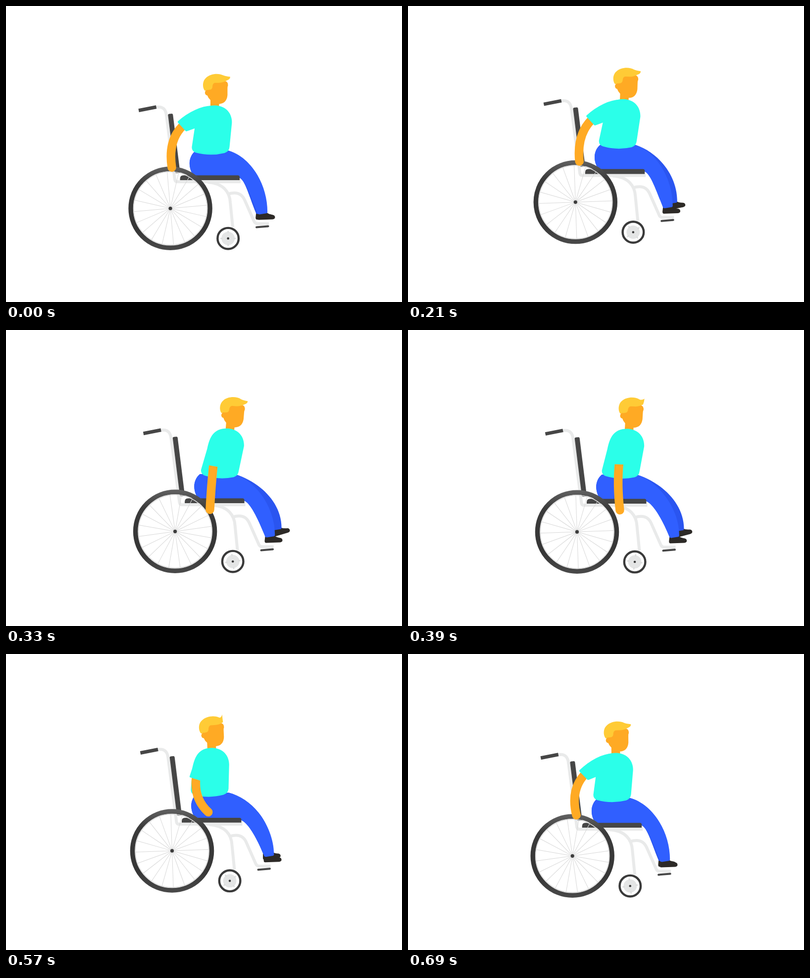
Animation of 800 by 600 pixels, one loop 0.72 s. Source, as an HTML page:

```html
<!DOCTYPE html>
<html lang="en">
<head>
<meta charset="utf-8">
<title>Wheelchair ride</title>
<style>
  html, body { margin: 0; width: 100%; height: 100%; overflow: hidden; background: #fff; }
  svg { display: block; width: 800px; height: 600px; }
  .tube { fill: none; stroke: #e9eaea; stroke-width: 6; stroke-linejoin: round; }
  .dark { fill: #464646; stroke: #464646; stroke-linecap: round; stroke-linejoin: round; }
  .spokes { stroke: #d8d8d8; stroke-width: 1; }
  .shirt { fill: #2bffe9; }
  .skin { fill: #ffaa24; }
  .hair { fill: #ffcb36; }
  .shoe { fill: #2d2a27; }
</style>
</head>
<body>
<svg viewBox="0 0 800 600">
  <defs>
    <linearGradient id="rim" x1="0" y1="-85" x2="0" y2="85" gradientUnits="userSpaceOnUse">
      <stop offset="0" stop-color="#626262"/>
      <stop offset=".22" stop-color="#3b3b3b"/>
      <stop offset=".75" stop-color="#363636"/>
      <stop offset="1" stop-color="#4a4a4a"/>
    </linearGradient>
    <path id="shoe" d="M-10 1 L8 -1 Q13 3 21 4 Q25 5 25 9 Q25 12 20 13 L-8 14 Q-11 14 -11 10 Z"/>
  </defs>

  <g class="chair">
    <path class="tube" d="M-29 -205 C-14 -208 -9 -199 -8 -188 L9 -58 Q10 -54 14 -54 H142"/>
    <path class="dark" stroke-width="7" stroke-linecap="butt" d="M-64 -198.500 L-28.500 -205.500" style="stroke-linecap: butt"/>
    <path class="dark" stroke-width="5" d="M-2.300 -189 L2.700 -189.500 L17 -74 H12 Z"/>
    <path class="tube" d="M75 -53 C108 -51 120 -32 121 -12 L126 38"/>
    <path class="tube" d="M116 -29 C138 -36 146 -26 150 -17 L169 26 Q171 31 176 31 H199"/>
    <path class="dark" stroke-width="4" d="M174 38.200 L197.500 36.200"/>
  </g>

  <use id="farShoe" href="#shoe" class="shoe"/>
  <path id="farLeg" fill="#2a55f0"/>
  <use id="nearShoe" href="#shoe" class="shoe"/>
  <path id="nearLeg" fill="#305fff"/>

  <g class="chair">
    <path d="M19.500 -57.200 V-60 Q19.500 -67 26 -67 H136 Q140 -67 140 -63 V-57.200 Z" fill="#464646"/>
    <circle r="80" fill="none" stroke="url(#rim)" stroke-width="9.500"/>
    <circle r="74" fill="none" stroke="#dedede" stroke-width="1.500"/>
    <g id="spokes" class="spokes"></g>
    <circle r="3.600" fill="#3c3c3c"/>
    <g transform="translate(116.600 60.900)">
      <circle r="21.300" fill="#fff" stroke="#3a3a3a" stroke-width="4.400"/>
      <circle r="13.500" fill="#e4e5e5"/>
      <g id="caster" stroke="#dcdddd" stroke-width="2.500"></g>
      <circle r="2.300" fill="#3a3a3a"/>
    </g>
  </g>

  <g id="head">
    <path class="skin" d="M-9 3 V-12 Q-18 -20 -17 -36 L-4 -50 H22 Q27 -48 26.500 -41 Q25.500 -40 25.500 -36 V-22 Q24 -5 8.500 -4 V3 Z"/>
    <path id="hair" class="hair"/>
    <ellipse class="skin" cx="-15.500" cy="-27" rx="4.500" ry="5.500"/>
  </g>
  <path id="torso" class="shirt"/>
  <path id="arm" fill="none" stroke="#ffaa24" stroke-width="17.500" stroke-linecap="round"/>
  <path id="sleeve" class="shirt" stroke="#2bffe9" stroke-width="4" stroke-linejoin="round"/>
</svg>
<script>
const LOOP = 720, STEP = 30;
const RAD = Math.PI / 180;
const $ = id => document.getElementById(id);

// Mean plus cosine and sine amplitudes of the first, second, ... harmonic.
const wave = (phase, mean, ...amps) => amps.reduce((sum, a, i) =>
  sum + a * (i % 2 ? Math.sin : Math.cos)(phase * (1 + (i >> 1))), mean);

const off = (p, x, y) => [p[0] + x, p[1] + y];
// Point at a distance below p, swung backwards by an angle in degrees.
const swung = (p, angle, length) =>
  off(p, -length * Math.sin(angle * RAD), length * Math.cos(angle * RAD));
const mid = (a, b) => [(a[0] + b[0]) / 2, (a[1] + b[1]) / 2];

const draw = (id, ...parts) => $(id).setAttribute('d', parts.map(
  p => typeof p === 'string' ? p : p.map(n => n.toFixed(2)).join(' ')).join(' '));
const move = (el, p, angle = 0) =>
  el.setAttribute('transform', `translate(${p[0].toFixed(2)} ${p[1].toFixed(2)}) rotate(${angle.toFixed(2)})`);

function leg(id, hub, ankle) {
  const c = (x, y) => off(hub, x, y);
  const inner = off(ankle, -9.7, 2), outer = off(ankle, 9.7, -2);
  draw(id, 'M', c(114, -118), 'C', c(162, -106), off(outer, 0, -57), outer,
    'Q', off(outer, 0, 3), off(outer, -4, 3), 'L', off(inner, 3, 1), 'L', inner,
    'C', off(inner, -17, -42), c(150, -62), c(136, -63), 'L', c(56, -63),
    'Q', c(45, -64), c(42, -75), 'C', c(35, -92), c(40, -108), c(50, -116), 'Z');
}

function drawLegs(hub, phase) {
  const near = off(hub, wave(phase, 191.4, -2.3, -6.7, -1.8, 1), 9.3);
  const rise = wave(phase, 2.3, 6.5, 1.9, -1, 1);
  const far = off(hub, wave(phase, 194.7, -10.7, -4.8), rise);
  leg('farLeg', hub, far);
  leg('nearLeg', hub, near);
  move($('farShoe'), far, rise - 9);
  move($('nearShoe'), near);
}

function drawHead(neck, lean, recover) {
  move($('head'), off(neck, .2 * lean + .015 * lean * lean, 1.2), .3 * lean);
  const tip = [31 - 8 * recover, -59 - 10 * recover];
  draw('hair', 'M -20 -31 C -25 -36 -26 -50 -18 -57 C -9 -66 8 -67 17 -62 Q 22 -60', tip,
    'Q', off(tip, 0, 5), [25, -52], 'Q 17 -47 8 -47 H 0 Q -5 -46 -5 -38 Q -6 -33 -11 -33 Z');
}

function drawTorso(hub, neck, lean) {
  const shoulder = off(neck, 34.3, 36), side = off(neck, -40, 41);
  const back = off(hub, 42.5 + .6 * lean, -114);
  const front = off(back, 76, 1.7 + .15 * lean);
  draw('torso', 'M', neck, 'C', off(neck, 24, 1), off(shoulder, 1, -18), shoulder,
    'L', off(front, 1, -12), 'Q', off(front, 0, -3), off(front, -9, 0),
    'Q', off(mid(back, front), 0, 8), off(back, 9, 1),
    'Q', off(back, 0, -2), off(back, 1, -11), 'L', side,
    'C', off(side, 5, -24), off(neck, -27, 0), neck, 'Z');
}

function drawArm(hub, neck, phase, recover) {
  const swing = wave(phase, 39.8, 19.8, 29.7, -.8, -5.5, 5.2);
  const grip = wave(phase, 28.3, -20.2, -26.4, 3.4, 2.7, -6);
  const pivot = off(neck, -14, 20);
  const cuff = swung(pivot, swing, 56 - 12 * recover);
  const elbow = swung(cuff, Math.max(6, swing - 22), 42);
  // The hand follows the rim and lifts off it on the way back.
  const hand = swung(hub, grip, -83 - 28 * recover);
  draw('arm', 'M', cuff, 'Q', elbow, hand);

  const bend = .72 * swing;
  const outer = swung(cuff, bend + 90, 11.5), inner = swung(cuff, bend + 90, -11.5);
  draw('sleeve', 'M', off(neck, -4, 3), 'C', off(neck, -26, 2),
    swung(outer, bend, -27), outer, 'L', inner, 'L', off(pivot, 14, 10), 'Z');
}

function render(t) {
  const phase = 2 * Math.PI * (t + 30) / LOOP;
  const recover = Math.max(0, -Math.sin(phase));
  const hub = [wave(phase, 336.9, -4.7, -1.1), wave(phase, 403.8, .5, -.5, 5, 3.5)];
  const lean = wave(phase, 2.5, -8.4, 4.3, 4, 1.9);
  const neck = off(hub, 90 + lean, -208.8);
  const turn = 360 * t / LOOP;

  document.querySelectorAll('.chair').forEach(el => move(el, hub));
  move($('spokes'), [0, 0], turn / 5 - 5);
  move($('caster'), [0, 0], turn / 2);

  drawLegs(hub, phase);
  drawHead(neck, lean, recover);
  drawTorso(hub, neck, lean);
  drawArm(hub, neck, phase, recover);
}

function addSpokes(id, count, from, to) {
  for (let i = 0; i < count; i++) {
    const line = document.createElementNS('http://www.w3.org/2000/svg', 'line');
    line.setAttribute('x1', from);
    line.setAttribute('x2', to);
    line.setAttribute('transform', `rotate(${i * 360 / count})`);
    $(id).append(line);
  }
}
addSpokes('spokes', 20, 3, 74);
addSpokes('caster', 4, 11, 15.5);

const start = performance.now();
function tick() {
  const t = (performance.now() - start) % LOOP;
  render(Math.floor(t / STEP) * STEP);
  requestAnimationFrame(tick);
}
tick();
</script>
</body>
</html>
```
